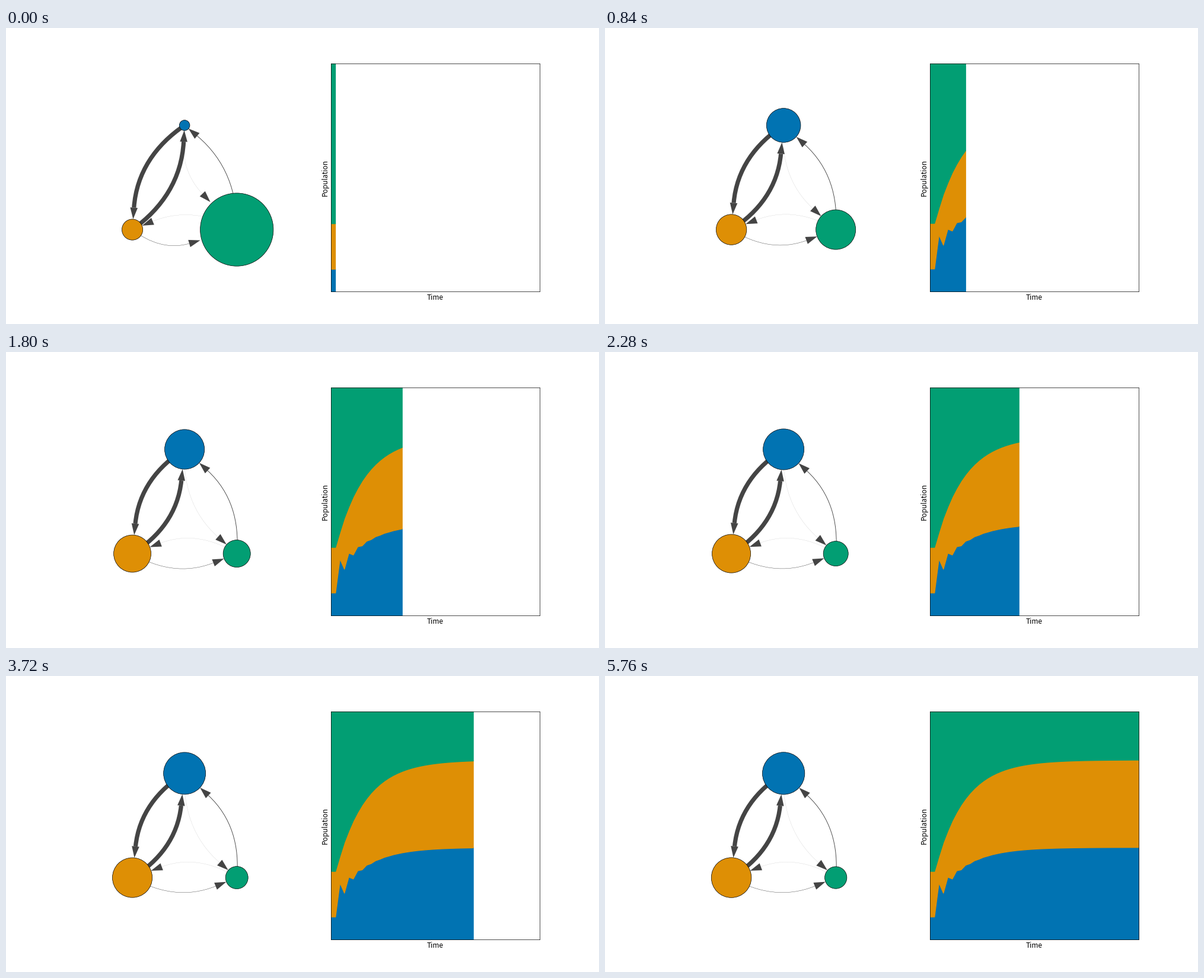
Write a matplotlib script that moves like this. It is 1000 px wide and 500 px high and loops after 5.88 s.

```python
import numpy as np
import matplotlib.pyplot as plt
from matplotlib.animation import FuncAnimation
from matplotlib.patches import Circle, PathPatch, Polygon
from matplotlib.path import Path

FRAMES, INTERVAL = 49, 120
COLORS = ["#0173b2", "#de8f05", "#029e73"]
INK = "#444444"
NODES = np.array([[0, 1], [-1, -1], [1, -1]], float)
STEP = np.array([[0.19, 0.80, 0.01],
                 [0.80, 0.15, 0.05],
                 [0.10, 0.01, 0.89]])
LINKS = [(a, b) for a in range(3) for b in range(3) if a != b]
BEND = -0.3
OUTLINE = 0.5
UNIT = 88.07                  # pixels per data unit in the graph
HEAD = 19.3 / UNIT            # arrowhead length
HALF = 6.3 / UNIT             # half of its width
CURVE = [Path.MOVETO] + [Path.CURVE4] * 3

states = [np.array([0.1, 0.2, 0.7])]
for _ in range(FRAMES - 1):
    states.append(states[-1] @ STEP)
history = np.array([states[0]] + states)
levels = np.hstack([np.zeros((len(history), 1)), np.cumsum(history, axis=1)])


def controls(p, q):
    """Inner control points of a bowed cubic from p to q."""
    d = q - p
    side = BEND * 0.5 * np.array([-d[1], d[0]])
    return p + d / 3 + side, p + 2 * d / 3 + side


def cubic(pts, t):
    a, b, c, d = pts
    u = 1 - t
    return u**3 * a + 3 * u * u * t * b + 3 * u * t * t * c + t**3 * d


def tip_on_circle(pts, radius):
    """Walk along the curve until it is within 5 % of the end circle."""
    def miss(t):
        return np.hypot(*(cubic(pts, t) - pts[3])) - radius

    t0, t1 = 1.0, 1 - radius / np.hypot(*(pts[3] - pts[0]))
    e0, e1 = -radius, miss(t1)
    for _ in range(10):
        if abs(e1) <= radius / 20:
            break
        if (e1 > 0) != (e0 > 0):
            t = (t0 + t1) / 2
        elif abs(e1) < abs(e0):
            t = t1 + (t1 - t0) / 2
        else:
            t = t1 - (t1 - t0)
        t = min(1.0, max(0.0, t))
        t0, e0, t1, e1 = t1, e1, t, miss(t)
    return cubic(pts, t1)


def arrow(src, dst, radius):
    """Curve points and head triangle of one arrow."""
    tip = tip_on_circle((src, *controls(src, dst), dst), radius)
    axis = (dst - tip) / np.hypot(*(dst - tip))
    across = np.array([-axis[1], axis[0]])
    base = tip - HEAD * axis
    c1, c2 = controls(src, base)
    c2 = c2 + across * ((base - c2) @ across)
    head = [base + HALF * across, tip, base - HALF * across]
    return [src, c1, c2, base], head


fig, (graph, area) = plt.subplots(1, 2, figsize=(10, 5), dpi=100)
fig.patch.set_facecolor("white")

graph.set_axis_off()
graph.set_xlim(-2, 2)
graph.set_ylim(-192.5 / UNIT, 192.5 / UNIT)

area.set_xlim(0, 47)
area.set_ylim(0, 1)
area.set_xticks([])
area.set_yticks([])
for spine in area.spines.values():
    spine.set_linewidth(OUTLINE)

label = dict(family="Noto Sans CJK JP", size=8.6, color="black", ha="center",
             va="baseline", rotation_mode="anchor")
fig.text(0.7239, 1 - 459.3 / 500, "Time", **label)
fig.text(0.5415, 1 - 252.7 / 500, "Population", rotation=90, **label)

shafts, heads = [], []
for a, b in LINKS:
    shafts.append(PathPatch(Path(np.zeros((4, 2)), CURVE), fill=False,
                            edgecolor=INK, linewidth=6.5 * STEP[a, b],
                            capstyle="butt"))
    heads.append(Polygon(np.zeros((3, 2)), facecolor=INK, linewidth=0))
    graph.add_patch(shafts[-1])
    graph.add_patch(heads[-1])

discs = [Circle(p, 0.1, facecolor=c, edgecolor="black", linewidth=OUTLINE, zorder=3)
         for p, c in zip(NODES, COLORS)]
for disc in discs:
    graph.add_patch(disc)

bands = []


def draw(i):
    now = states[i]
    for disc, share in zip(discs, now):
        disc.set_radius(share)
    for (a, b), shaft, head in zip(LINKS, shafts, heads):
        curve, corners = arrow(NODES[a], NODES[b], now[b])
        shaft.set_path(Path(curve, CURVE))
        head.set_xy(corners)

    while bands:
        bands.pop().remove()
    x = np.arange(i + 2)
    for j, color in enumerate(COLORS):
        bands.append(area.fill_between(x, levels[:i + 2, j], levels[:i + 2, j + 1],
                                       facecolor=color, edgecolor=color,
                                       linewidth=1))
    return shafts + heads + discs + bands


anim = FuncAnimation(fig, draw, frames=FRAMES, interval=INTERVAL,
                     init_func=lambda: draw(0), repeat=True, repeat_delay=0,
                     blit=False)
plt.show()
```
